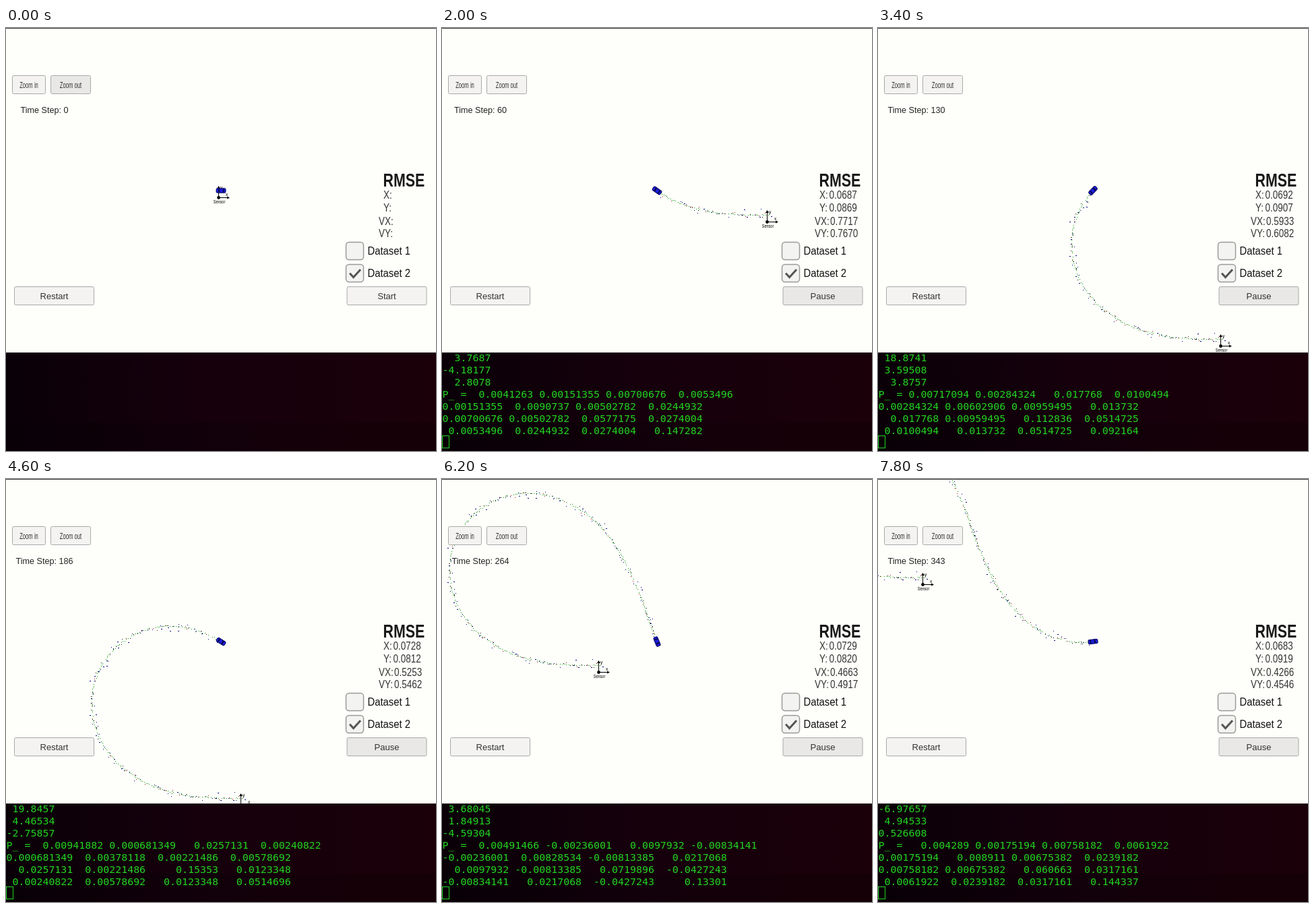
Animation of 638 by 627 pixels, one loop 8 s. Source, as an HTML page with a canvas:

```html
<!DOCTYPE html>
<html lang="en">
<head>
<meta charset="utf-8">
<title>Sensor fusion simulator</title>
<style>
html, body { margin: 0; width: 100%; height: 100%; overflow: hidden; background: #fefffb; }
canvas { display: block; width: 638px; height: 627px; }
</style>
</head>
<body>
<canvas id="stage" width="638" height="627"></canvas>
<script>
const W = 638, H = 627, LOOP = 8000, TICK = 200, LAST = 343;
const TERM_Y = 481, CAR_X = 319, CAR_Y = 241;
const SANS = '"Liberation Sans", Arial, sans-serif';
const MONO = '"DejaVu Sans Mono", monospace';
const ctx = document.getElementById('stage').getContext('2d');
const { sin, cos, atan2, round, PI } = Math;
const rad = deg => deg * PI / 180;

// time in ms, simulation step
const CLOCK = [[1000, 8], [1400, 28], [2600, 91], [3400, 130], [4600, 186], [6200, 264], [7800, LAST]];

function stepAt(ms) {
  if (ms < CLOCK[0][0]) return 0;
  const i = Math.max(1, CLOCK.findIndex(key => ms <= key[0]));
  const [t0, s0] = CLOCK[i - 1], [t1, s1] = CLOCK[i];
  return round(s0 + (s1 - s0) * (ms - t0) / (t1 - t0));
}

// The car swings its heading like a pendulum; up is positive.
const heading = step => rad(55 + 125 * cos(rad(0.72 * (step + 1))));
const pace = step => 1 - 0.04 * cos(rad(1.2 * step));

// car positions relative to the sensor, in pixels
const path = [[4, -10]];
for (let i = 0; i < LAST; i++) {
  const [x, y] = path[i], a = heading(i + 0.5), d = 2.99 * pace(i + 0.5);
  path.push([x + d * cos(a), y - d * sin(a)]);
}

function rand(n) {
  const x = sin(n * 12.9898 + 4.1) * 43758.5453;
  return x - Math.floor(x);
}
const noise = n => rand(n) + rand(n + 0.31) + rand(n + 0.67) - 1.5;

function text(str, x, y, size, { color = '#333', align = 'left', weight = 'normal', squeeze = 1, family = SANS } = {}) {
  ctx.save();
  ctx.translate(x, y);
  ctx.scale(squeeze, 1);
  ctx.font = `${weight} ${size}px ${family}`;
  ctx.textAlign = align;
  ctx.fillStyle = color;
  ctx.fillText(str, 0, 0);
  ctx.restore();
}

function box(x, y, w, h, r, fill, stroke, line = 1) {
  ctx.beginPath();
  ctx.roundRect(x, y, w, h, r);
  ctx.fillStyle = fill;
  ctx.fill();
  ctx.strokeStyle = stroke;
  ctx.lineWidth = line;
  ctx.stroke();
}

function button(label, x, y, w, hover, size, squeeze) {
  box(x + 0.5, y + 0.5, w, 27, 2, hover ? '#e9e8e7' : '#f4f3f2', '#a9a9a9');
  text(label, x + w / 2 + 0.5, y + (size < 13 ? 18.5 : 19), size, { align: 'center', squeeze });
}

function checkbox(label, y, checked) {
  box(504.5, y + 0.5, 26, 26, 4.5, '#f3f3f1', '#9a9a9a', 1.5);
  if (checked) {
    ctx.beginPath();
    ctx.moveTo(510, y + 13.5);
    ctx.lineTo(515.5, y + 19.5);
    ctx.lineTo(526, y + 8);
    ctx.strokeStyle = '#555';
    ctx.lineWidth = 3;
    ctx.stroke();
  }
  text(label, 536.5, y + 19, 15.6, { color: '#111', squeeze: 0.95 });
}

function trail(step, ox, oy) {
  for (let i = 1; i < step; i++) {
    const [x, y] = path[i];
    const dot = (seed, spread, color, w = 1) => {
      ctx.fillStyle = color;
      ctx.fillRect(round(ox + x + noise(i + seed) * spread), round(oy + y + noise(i + seed + 0.5) * spread), w, 1);
    };
    if (rand(i + 900) < 0.9) dot(100, 1, '#109a10');
    if (i % 2) {
      if (rand(i + 500) < 0.75) dot(200, 7, '#00007a', rand(i + 600) < 0.3 ? 2 : 1);
    } else if (rand(i + 700) < 0.8) {
      dot(300, 3.5, rand(i + 800) < 0.45 ? '#b01010' : '#181010');
    }
  }
}

function sensor(x, y) {
  ctx.fillStyle = ctx.strokeStyle = '#000';
  ctx.lineWidth = 1;
  ctx.beginPath();
  ctx.moveTo(x + 0.5, y - 15);
  ctx.lineTo(x + 0.5, y + 0.5);
  ctx.lineTo(x + 15, y + 0.5);
  ctx.stroke();
  ctx.beginPath();
  ctx.arc(x + 0.5, y + 0.5, 2.4, 0, 7);
  ctx.moveTo(x + 0.5, y - 17);
  ctx.lineTo(x + 3, y - 13);
  ctx.lineTo(x - 2, y - 13);
  ctx.moveTo(x + 17, y + 0.5);
  ctx.lineTo(x + 13, y + 2.5);
  ctx.lineTo(x + 13, y - 1.5);
  ctx.fill();
  text('y', x + 3, y - 12, 6.5, { color: '#000' });
  text('x', x + 11, y - 2, 6.5, { color: '#000' });
  text('Sensor', x + 1.5, y + 9, 6.5, { color: '#000', align: 'center', squeeze: 0.85 });
}

function car(step) {
  ctx.save();
  ctx.translate(CAR_X, CAR_Y);
  ctx.rotate(-heading(step));
  box(-7, -3.2, 14, 6.4, 2, '#1c1cd8', '#08085c');
  ctx.fillStyle = '#05053a';
  ctx.fillRect(-4.5, -2.4, 1.6, 4.8);
  ctx.fillRect(1.8, -2.6, 2, 5.2);
  ctx.restore();
}

// position errors waver, velocity errors decay
const rmse = step => [
  0.071 - 0.003 * cos(2 * PI * (step - 91) / 270),
  0.085 + 0.007 * sin(2 * PI * (step - 50) / 230),
  (28 / step) ** 0.34,
  0.964 * (28 / step) ** 0.3
];

// symmetric 2x2 block with one variance along the line of sight and one across it
function block(bearing, along, across) {
  const c = cos(bearing), s = sin(bearing);
  const mixed = (along - across) * c * s;
  return [along * c * c + across * s * s, mixed, along * s * s + across * c * c];
}

function covariance(step) {
  const [x, y] = path[step], bearing = atan2(-y, x);
  const [xx, xy, yy] = block(bearing, 0.0037, 0.0095);
  const [xu, xv, yv] = block(bearing, 0.0055, 0.026);
  const [uu, uv, vv] = block(bearing, 0.05, 0.155);
  const yu = xv * (0.9 + 0.2 * rand(step));
  return [[xx, xy, xu, xv], [xy, yy, yu, yv], [xu, yu, uu, uv], [xv, yv, uv, vv]];
}

// right-aligned numbers sharing one column width
function matrix(rows) {
  const cells = rows.map(row => row.map(v => String(+v.toPrecision(6))));
  const width = Math.max(...cells.flat().map(s => s.length));
  return cells.map(row => row.map(s => s.padStart(width)).join(' '));
}

function terminalLines(step) {
  const [x, y] = path[step], speed = 5.1 * pace(step), a = heading(step - 1);
  const state = [x / 12.2, -y / 12.2, speed * cos(a), speed * sin(a)];
  const rows = matrix(covariance(step));
  rows[0] = 'P_ = ' + rows[0];
  return [...matrix(state.map(v => [v])).slice(1), ...rows];
}

function terminal(step) {
  const g = ctx.createLinearGradient(0, 0, W, 0);
  g.addColorStop(0, '#0a0007');
  g.addColorStop(0.45, '#15000c');
  g.addColorStop(1, '#1b0009');
  ctx.fillStyle = g;
  ctx.fillRect(0, TERM_Y, W, H - TERM_Y);
  ctx.fillStyle = 'rgba(0,0,0,.18)';
  ctx.fillRect(0, 585, W, H - 585);
  if (!step) return;
  const style = { color: '#22d422', family: MONO, squeeze: 1.09 };
  terminalLines(step).forEach((line, i) => text(line, 0.5, 493.5 + 18 * i, 13.7, style));
  ctx.strokeStyle = style.color;
  ctx.lineWidth = 1;
  ctx.strokeRect(0.5, 604.5, 10, 18);
}

function panel(step) {
  const running = step > 0, errors = rmse(step);
  button('Zoom in', 9, 70, 49, false, 12, 0.64);
  button('Zoom out', 66, 70, 59, !running, 12, 0.64);
  text('Time Step: ' + step, 57, 126, 13, { align: 'center', color: '#222', squeeze: 0.97 });
  text('RMSE', 559.5, 234.5, 27, { weight: 'bold', squeeze: 0.79, color: '#181818' });
  ['X:', 'Y:', 'VX:', 'VY:'].forEach((name, i) => {
    const wide = i > 1, y = [252.5, 271.5, 291.5, 309.5][i];
    const style = { squeeze: 0.84, color: '#333' };
    text(name, wide ? 553 : 560, y, 16, style);
    if (running) text(errors[i].toFixed(4), wide ? 576 : 574.5, y, 16, style);
  });
  checkbox('Dataset 1', 317, false);
  checkbox('Dataset 2', 350, true);
  button('Restart', 12, 383, 118, false, 13);
  button(running ? 'Pause' : 'Start', 505.5, 383, 118, running, 13);
}

function draw(ms) {
  const step = stepAt(Math.floor(ms / TICK) * TICK);
  const [x, y] = path[step];
  const ox = round(CAR_X - x), oy = round(CAR_Y - y);
  ctx.fillStyle = '#fefffb';
  ctx.fillRect(0, 0, W, H);
  trail(step, ox, oy);
  sensor(ox, oy);
  car(step);
  panel(step);
  terminal(step);
  ctx.fillStyle = '#3a3a3a';
  ctx.fillRect(0, 0, W, 1);
}

const start = performance.now();
function loop() {
  draw((performance.now() - start) % LOOP);
  requestAnimationFrame(loop);
}
loop();
</script>
</body>
</html>
```
